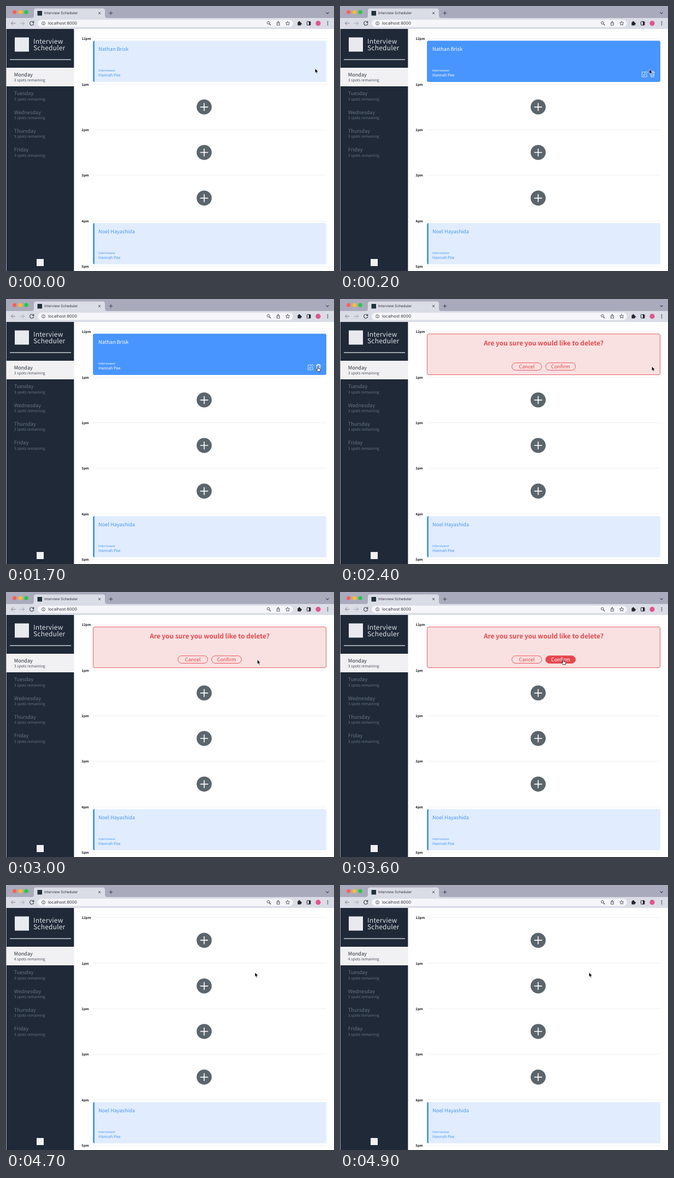
These frames come from a looping animation (600x485 px, 5000 ms). An HTML page:

```html
<!DOCTYPE html>
<html lang="en">
<head>
<meta charset="utf-8">
<title>Interview Scheduler</title>
<style>
html, body { margin: 0; width: 100%; height: 100%; overflow: hidden; background: #fff; }
svg { display: block; width: 100vw; height: 100vh; }
text {
  font-family: "Noto Sans CJK JP", "Noto Sans CJK SC", "Noto Sans CJK KR", "Noto Sans CJK", "Open Sans", sans-serif;
  text-rendering: geometricPrecision;
  white-space: pre;
}
.ui { font-family: Inter, Roboto, sans-serif; }
.line { fill: none; stroke-linecap: round; stroke-linejoin: round; }
</style>
</head>
<body>
<svg id="stage" viewBox="0 0 600 485" preserveAspectRatio="none" xmlns="http://www.w3.org/2000/svg"></svg>
<script>
const LOOP = 5000, STEP = 100;
const BLUE = '#4a97f2', RED = '#e5484d', NAVY = '#1f2937';
const AT = { hover: 100, ask: 1800, remove: 3800, empty: 4500 };

const text = (x, y, size, fill, str, extra = '') =>
  `<text x="${x}" y="${y}" font-size="${size}" fill="${fill}" ${extra}>${str}</text>`;
const rect = (x, y, w, h, fill, rx = 0, extra = '') =>
  `<rect x="${x}" y="${y}" width="${w}" height="${h}" rx="${rx}" fill="${fill}" ${extra}/>`;
const circle = (x, y, r, fill, extra = '') =>
  `<circle cx="${x}" cy="${y}" r="${r}" fill="${fill}" ${extra}/>`;
const line = (d, stroke, w = 1, extra = '') =>
  `<path class="line" d="${d}" stroke="${stroke}" stroke-width="${w}" ${extra}/>`;
const group = (id, body) => `<g id="${id}">${body}</g>`;

function browser() {
  const ink = '#3c4047';
  const lights = ['#fe5f57', '#febc2e', '#28c840'].map((c, i) => circle(15.6 + i * 10.7, 11.2, 3.6, c)).join('');
  return rect(0, 0, 600, 485, '#a9abbc') + lights +
    '<path d="M47 22Q51 22 51 18V8.500Q51 4.500 55 4.500H177Q181 4.500 181 8.500V18Q181 22 185 22Z" fill="#dadce6"/>' +
    rect(0, 22, 600, 20, '#dadce6') +
    rect(57.500, 9, 8.500, 8.500, '#20303c') +
    text(70, 15.400, 6.500, '#30333a', 'Interview Scheduler', 'class="ui"') +
    line('M169.300 11.200l3.600 3.600m0-3.600l-3.600 3.600', ink, .9) +
    line('M188.800 13h6m-3-3v6', ink, 1) +
    line('M585.800 11.800l2.200 2.300l2.200-2.300', ink, 1.100) +
    line('M17 31.700H9.500m3.300-3.300l-3.300 3.300l3.300 3.300', '#85888f', 1) +
    line('M26 31.700h7.500m-3.300-3.300l3.300 3.300l-3.300 3.300', '#a3a6ae', 1) +
    line('M50 29.400A3.600 3.600 0 1 0 50.700 32.400M50.700 28v2.500h-2.500', ink, 1.100) +
    rect(58, 25, 467, 13.500, '#f5f5fa', 6.700) +
    circle(68.500, 31.700, 3, 'none', `stroke="${ink}" stroke-width=".8"`) +
    line('M68.500 31.600v1.500m0-3v.1', ink, .8) +
    text(77, 34.400, 7.500, '#3a3d43', 'localhost:8000', 'class="ui"') +
    circle(480, 30.800, 2.300, 'none', `stroke="${ink}" stroke-width=".9"`) +
    line('M481.800 32.700l2.200 2.300', ink, 1.100) +
    line('M496.600 30.500h-1.100v4.700h5v-4.700h-1.100M498 33v-5m-1.500 1.500l1.500-1.500l1.500 1.500', ink, .8) +
    line('M515.300 28l1.100 2.400l2.600.3l-1.900 1.800l.5 2.600l-2.300-1.300l-2.300 1.300l.5-2.600l-1.900-1.800l2.600-.3Z', ink, .8) +
    rect(533.500, 29.500, 6, 6, '#24262b', .8) + circle(536.400, 29.200, 1.400, '#24262b') + circle(539.800, 32.500, 1.300, '#24262b') +
    rect(550.500, 28.500, 6.500, 6.500, 'none', .6, 'stroke="#24262b" stroke-width="1"') + rect(554, 28.500, 3, 6.500, '#24262b') +
    circle(571, 31.700, 4.600, '#e0558c') +
    [-2.700, 0, 2.700].map(d => circle(588.500, 31.700 + d, .9, ink)).join('');
}

function sidebar() {
  const days = ['Monday', 'Tuesday', 'Wednesday', 'Thursday', 'Friday'];
  const logo = 'font-weight="300" letter-spacing=".2"';
  return rect(1, 42, 123.500, 443, NAVY) +
    rect(16, 57.500, 26, 26, '#e9eaee') +
    text(50, 69, 12, '#dfe3e8', 'Interview', logo) +
    text(50, 81, 12, '#dfe3e8', 'Scheduler', logo) +
    rect(7, 97.500, 112, 1.200, '#f4f4f6') +
    rect(1, 113, 124, 34, '#f1f0f3') +
    days.map((day, i) => {
      const y = 129 + i * 34.350, fill = i ? '#697584' : '#2a323f';
      return text(14.800, y, 9.150, fill, day) +
        text(14.800, y + 9.300, 6.900, i ? fill : '#4a515c', '3 spots remaining', `font-weight="300" ${i ? '' : 'id="spots"'}`);
    }).join('') +
    rect(56, 463, 13, 13, '#f1f1f3');
}

function card(y, name, on) {
  const ink = on ? '#fff' : BLUE;
  return rect(159, y, 427, 75.500, on ? '#4895ff' : '#e1edfe', 3) +
    (on ? '' : `<path d="M162 ${y}V${y + 75.500}Q159 ${y + 75.500} 159 ${y + 72.500}V${y + 3}Q159 ${y} 162 ${y}Z" fill="${BLUE}"/>`) +
    text(169, y + 18.300, 9.200, ink, name) +
    text(169, y + 56.800, 5.800, ink, 'Interviewer', 'font-weight="300"') +
    text(169, y + 65.900, 7.150, ink, 'Hannah Poe', 'font-weight="500"');
}

const icons = () =>
  line('M558.500 120.700h-6v9h8.700v-4.500M555.300 127l.5-2.300l5.200-5.200l1.900 1.900l-5.200 5.200Z', '#fff', 1, 'opacity=".75"') +
  line('M567.300 121.200h8.400M569.700 121v-1.500h3.600v1.500M568.300 121.500l.4 8.300h5.600l.4-8.300M570.300 123.300v4.700m2.400-4.700v4.700', '#fff', 1, 'id="bin"');

const add = y => circle(362.500, y, 13.800, '#5b656c') + line(`M356 ${y}h13m-6.500-6.500v13`, '#fff', 1.700);

const pill = (x, label, id) =>
  rect(x, 116.800, 54.500, 13.600, 'none', 6.800, `stroke="${RED}" stroke-width=".9" id="${id}"`) +
  text(x + 27.250, 127, 9.250, RED, label, `text-anchor="middle" id="${id}Text"`);

const ask = () =>
  rect(159.400, 63.900, 426.200, 74.700, '#fae1e1', 3, `stroke="${RED}" stroke-width=".9"`) +
  text(372.500, 84.700, 11.850, RED, 'Are you sure you would like to delete?', 'font-weight="600" text-anchor="middle"') +
  pill(314.500, 'Cancel', 'no') + pill(376.200, 'Confirm', 'yes');

const busy = () =>
  rect(159, 63.500, 427, 75.500, NAVY, 3) +
  circle(335.500, 101.300, 9.300, 'none', 'stroke="#69717c" stroke-width="1.800"') +
  line('M332.300 92.600A9.300 9.300 0 0 1 344.800 101.300', '#fff', 1.900, 'id="arc"') +
  text(359.300, 105.600, 12, '#fff', 'Deleting...', 'font-weight="600"');

function schedule() {
  const hours = ['12pm', '1pm', '2pm', '3pm', '4pm', '5pm'];
  return rect(124.500, 42, 475.500, 443, '#fff') +
    hours.map((h, i) => {
      const y = 59.300 + i * 83.400;
      return rect(159, y, 427, .8, '#ebebef') + text(138.300, y + 2.900, 6.100, '#15181d', h, 'font-weight="700"');
    }).join('') +
    add(184.800) + add(268) + add(351.600) +
    card(397.300, 'Noel Hayashida', false) +
    group('rest', card(63.500, 'Nathan Brisk', false)) +
    group('over', card(63.500, 'Nathan Brisk', true) + icons()) +
    group('ask', ask()) + group('busy', busy()) + group('empty', add(101.200));
}

const pointer = () => group('cursor',
  '<path id="arrow" d="M0 0V8.300L1.900 6.600L3.200 9.500L4.700 8.800L3.400 6H6Z" fill="#000" stroke="#fff" stroke-width=".7"/>' +
  '<path id="hand" d="M-.9 .7Q0-.6 .9 .7V3.300L3.900 4Q4.800 4.300 4.600 5.400L4 8.800H-.8L-3 5.700Q-3.300 4.600-2.200 4.700L-.9 5.700Z" fill="#fff" stroke="#000" stroke-width=".8"/>');

document.getElementById('stage').innerHTML = browser() + sidebar() + schedule() + pointer();

const el = id => document.getElementById(id);
const show = (id, on) => el(id).setAttribute('display', on ? 'inline' : 'none');
const clamp = v => Math.max(0, Math.min(1, v));
const ease = v => v * v * (3 - 2 * v);

// time, x, y of the pointer tip
const path = [
  [0, 565.300, 114.300], [800, 569, 124.300], [1200, 569, 124.300], [1700, 570.700, 124], [1800, 570.300, 123.300],
  [2500, 570.300, 123.300], [3300, 408.500, 124], [3800, 408.500, 124], [4100, 454.300, 159.300],
  [4900, 455.500, 160], [LOOP, 455.500, 160]
];

function pointAt(t) {
  const i = path.findIndex(k => k[0] > t);
  const [t0, x0, y0] = path[i - 1], [t1, x1, y1] = path[i];
  const p = ease((t - t0) / (t1 - t0));
  return [x0 + (x1 - x0) * p, y0 + (y1 - y0) * p];
}

function draw(t) {
  const [x, y] = pointAt(t);
  const asking = t >= AT.ask && t < AT.remove;
  const onBin = t >= AT.hover && t < AT.ask && x > 567 && y > 119;
  const onYes = asking && x < 431;

  show('rest', t < AT.hover);
  show('over', t >= AT.hover && t < AT.ask);
  show('ask', asking);
  show('busy', t >= AT.remove && t < AT.empty);
  show('empty', t >= AT.empty);
  el('spots').textContent = (t >= AT.empty ? 4 : 3) + ' spots remaining';

  el('bin').setAttribute('opacity', .75 + .25 * clamp((t - 900) / 300));
  el('yes').setAttribute('fill', onYes ? RED : 'none');
  el('yesText').setAttribute('fill', onYes ? '#fff' : RED);
  el('arc').setAttribute('transform', `rotate(${(t - 4100) * .36} 335.5 101.3)`);

  show('hand', onBin || onYes);
  show('arrow', !onBin && !onYes);
  el('cursor').setAttribute('transform', `translate(${x} ${y})`);
}

function tick() {
  draw(Math.floor(performance.now() % LOOP / STEP) * STEP);
  requestAnimationFrame(tick);
}
tick();
</script>
</body>
</html>
```
